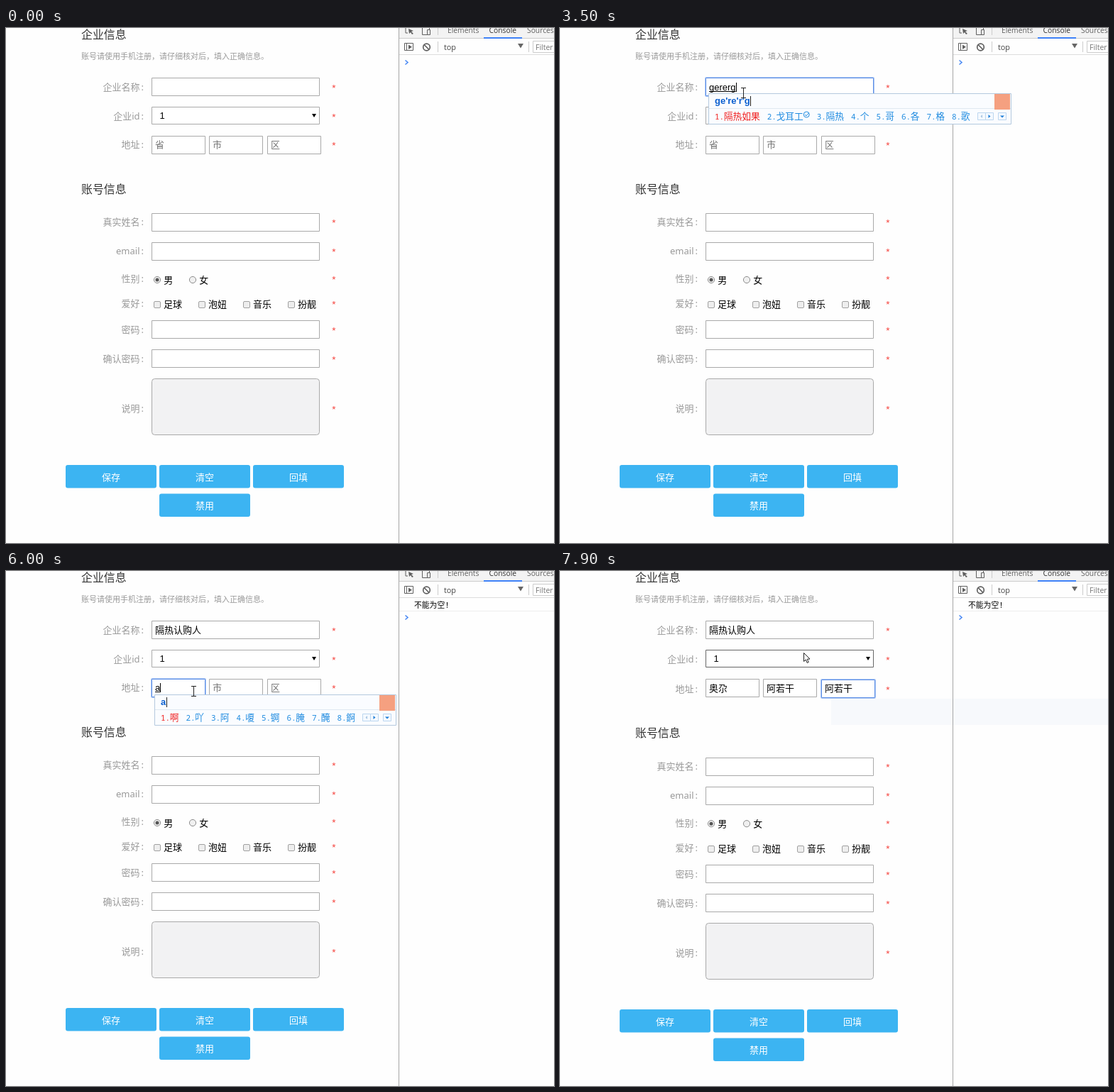
These frames come from a looping animation (772x726 px, 8000 ms). An HTML page with a canvas:

```html
<!DOCTYPE html>
<html lang="zh">
<head>
<meta charset="utf-8">
<style>
html, body { margin: 0; width: 100%; height: 100%; overflow: hidden; background: #fefefe; }
canvas { display: block; }
</style>
</head>
<body>
<canvas id="stage" width="772" height="726"></canvas>
<script>
const ctx = document.getElementById('stage').getContext('2d');
const LOOP = 8000, STEP = 100, SHIFT_AT = 6700, CHECK_AT = 4600;
const LEFT = 205, WIDE = 236;
const CJK = '"Noto Sans CJK SC", "Noto Sans CJK", sans-serif';
const PAGE = '"Noto Sans", ' + CJK;
const INPUT = '"Liberation Sans", ' + CJK;
const TOOL = '"Open Sans", ' + CJK;

const fields = {
  name: { x: LEFT, y: 70, w: WIDE },
  prov: { x: LEFT, y: 152, w: 75, hint: '省' },
  city: { x: 286, y: 152, w: 75, hint: '市' },
  area: { x: 368, y: 152, w: 75, hint: '区' }
};
const address = ['prov', 'city', 'area'];
const plainRows = [261, 302, 412, 453];

const wordsA = '啊 吖 阿 嗄 锕 腌 醃 錒';
const wordsAr = '阿热 啊 吖 阿 嗄 锕 腌 醃';
const wordsArg = '阿若干 阿热 阿让 啊 吖 阿 嗄 锕';
const wordsG = '个 哥 各 格 歌 给 过 国';

// time, focused field, committed text, composition, candidates ("+" adds a check badge)
const script = [
  [2200, 'name', ''],
  [3200, 'name', '', 'g', wordsG],
  [3300, 'name', '', "ge'r", '个人 戈尔 个 哥 各 格 歌 隔'],
  [3400, 'name', '', "ge're", '隔热 个 哥 各 格 歌 隔 割'],
  [3500, 'name', '', "ge're'r'g", '隔热如果 戈耳工+ 隔热 个 哥 各 格 歌'],
  [3600, 'name', '', "ge're'r'g'r", '隔热认购人 戈耳工+ 隔热 个人 各人 哥 格 歌'],
  [3700, 'name', '隔热认购人'],
  [CHECK_AT, null],
  [5300, 'prov', ''],
  [6000, 'prov', '', 'a', wordsA],
  [6100, 'prov', '', 'ao', '奥 傲 熬 澳 袄 凹 敖 翱'],
  [6200, 'prov', '', "ao'g", '奥尕 奥 傲 熬 澳 袄 凹 敖'],
  [6300, 'prov', '奥尕'],
  [6400, 'city', ''],
  [6500, 'city', '', "a'r", wordsAr],
  [6700, 'city', '', "a'r'g", wordsArg],
  [6800, 'city', '阿若干'],
  [7000, 'area', ''],
  [7100, 'area', '', 'a', wordsA],
  [7200, 'area', '', "a'r", wordsAr],
  [7300, 'area', '', "a'r'g", wordsArg],
  [7400, 'area', '阿若干']
];
// the first long composition shows eight candidates
script[4][4] = script[4][4].replace('隔热 个 哥', '隔热 个 哥 各').replace('各 各', '各');

const path = [
  [100, 766, 162], [200, 661, 371], [300, 583, 446], [400, 441, 596], [500, 330, 640],
  [700, 262, 630], [900, 242, 552], [1100, 250, 80], [1300, 256, 442], [1500, 256, 442],
  [1900, 258, 164], [2200, 258, 91], [3700, 258, 91], [3900, 278, 198], [4000, 272, 206],
  [4200, 167, 577], [4400, 163, 634], [4600, 163, 634], [4800, 358, 207], [5100, 270, 172],
  [5300, 264, 169], [6300, 264, 169], [6400, 330, 165], [6800, 330, 165], [6900, 397, 165],
  [7400, 397, 165], [7500, 330, 366], [7600, 330, 362], [7700, 332, 268], [7800, 372, 205],
  [7900, 343, 115]
];

// cy is the middle of the line
function text(s, x, cy, size, color, family = PAGE, align = 'left', weight = 400) {
  ctx.font = `${weight} ${size}px ${family}`;
  ctx.fillStyle = color;
  ctx.textAlign = align;
  ctx.fillText(s, x, cy + size * 0.37);
  return ctx.measureText(s).width;
}

function rect(x, y, w, h, color) {
  ctx.fillStyle = color;
  ctx.fillRect(x, y, w, h);
}

function frame(x, y, w, h, border, fill, radius = 0) {
  ctx.beginPath();
  ctx.roundRect(x + 0.5, y + 0.5, w, h, radius);
  if (fill) { ctx.fillStyle = fill; ctx.fill(); }
  if (border) { ctx.strokeStyle = border; ctx.lineWidth = 1; ctx.stroke(); }
}

function poly(points, fill, stroke, width = 1, close = true) {
  ctx.beginPath();
  points.forEach(([x, y]) => ctx.lineTo(x, y));
  if (close) ctx.closePath();
  if (fill) { ctx.fillStyle = fill; ctx.fill(); }
  if (stroke) { ctx.strokeStyle = stroke; ctx.lineWidth = width; ctx.stroke(); }
}

function disc(x, y, r, fill, stroke, width = 1) {
  ctx.beginPath();
  ctx.arc(x, y, r, 0, 7);
  if (fill) { ctx.fillStyle = fill; ctx.fill(); }
  if (stroke) { ctx.strokeStyle = stroke; ctx.lineWidth = width; ctx.stroke(); }
}

function label(s, cy) {
  text(s, 188.5, cy, 13, '#999', PAGE, 'right');
  text(':', 192.3, cy, 13, '#999', PAGE, 'center');
  text('*', 462, cy + 1, 13.5, '#f5403a', INPUT, 'center');
}

function button(s, x, y) {
  frame(x - 0.5, y - 0.5, 128, 32.5, null, '#3cb4f2', 3);
  text(s, x + 64, y + 16.7, 13, '#fff', PAGE, 'center');
}

function stateAt(t) {
  const texts = {};
  let now = null;
  for (const row of script) {
    if (row[0] > t) break;
    now = row;
    if (row[1]) texts[row[1]] = row[2];
  }
  const [since = 0, focus = null, , ime = '', words = ''] = now || [];
  return { texts, focus, ime, words, caret: (t - since) % 1000 < 500 };
}

function cursorAt(t) {
  if (t < path[0][0]) return null;
  const i = path.findIndex(p => p[0] > t);
  if (i < 0) return path[path.length - 1].slice(1);
  const [t0, x0, y0] = path[i - 1], [t1, x1, y1] = path[i];
  const k = (t - t0) / (t1 - t0);
  return [x0 + (x1 - x0) * k, y0 + (y1 - y0) * k];
}

const inside = (p, x, y, w, h) => p && p[0] >= x && p[0] <= x + w && p[1] >= y && p[1] <= y + h;

function drawField(id, state, t) {
  const f = fields[id], focused = state.focus === id;
  const value = state.texts[id] || '';
  const typed = focused && state.ime ? state.ime.replace(/'/g, '') : value;
  const shifted = t >= SHIFT_AT && id !== 'name';
  const y = f.y + (shifted && (focused || !value) ? 1 : 0);
  const wrong = id === 'prov' && t >= CHECK_AT && t < 5300;
  if (focused) frame(f.x - 1, y - 1, f.w + 2, 27, '#a9c5f3', null, 1);
  frame(f.x, y, f.w, 25, focused ? '#5c8ee6' : '#a9a9a9', wrong ? '#ffa680' : '#fff');
  const cy = f.y + (shifted || id === 'name' ? 13.5 : 12.5);
  const x = f.x + 5;
  if (!typed && f.hint) text(f.hint, x, cy, 13, '#757575', INPUT);
  const w = typed ? text(typed, x, cy, 13, '#000', INPUT) : 0;
  if (focused && state.ime) rect(x, Math.round(cy + 5.5), w, 1, '#000');
  if (focused && state.caret) rect(Math.round(x + w), Math.floor(cy - 6.5), 1, 13, '#000');
}

function drawForm(state, t, pointer) {
  const d = t >= SHIFT_AT ? 2 : 0;
  text('企业信息', 106, 9.5, 15.9, '#333');
  text('账号请使用手机注册，请仔细核对后，填入正确信息。', 106, 40, 11, '#999');
  text('账号信息', 106, 227 + d * 0.75, 15.9, '#333');

  label('企业名称', 83);
  label('企业id', 124);
  label('地址', 164.5 + d * 0.75);
  ['真实姓名', 'email', '性别', '爱好', '密码', '确认密码', '说明'].forEach((s, i) =>
    label(s, [273.5, 314.5, 353.5, 388.5, 425.5, 466.5, 536.5][i] + d));

  drawField('name', state, t);
  const hover = inside(pointer, LEFT, 111, WIDE, 25);
  frame(LEFT, 111, WIDE, 24, hover ? '#666' : '#a9a9a9', '#fff');
  text('1', 216.5, 123.5, 13, '#000', INPUT);
  poly([[431, 121], [437, 121], [434, 126]], '#000');
  address.forEach(id => drawField(id, state, t));

  plainRows.forEach(y => frame(LEFT, y + d, WIDE, 25, '#a9a9a9', '#fff'));
  frame(LEFT, 494 + d, WIDE, 79, '#a9a9a9', '#f2f2f3', 4);

  [['男', 213], ['女', 263]].forEach(([s, x], i) => {
    disc(x, 355 + d * 0.6, 4.6, '#f0f0f0', '#8c8c8c');
    if (!i) disc(x, 355 + d * 0.6, 2.5, '#555');
    text(s, x + 9.3, 354.7 + d * 0.6, 13, '#000');
  });
  ['足球', '泡妞', '音乐', '扮靓'].forEach((s, i) => {
    const x = 208 + i * 63;
    frame(x, 385 + d, 9, 9, '#a0a0a0', '#eee', 1.5);
    text(s, x + 14, 389 + d, 13, '#000');
  });

  ['保存', '清空', '回填'].forEach((s, i) => button(s, 84 + i * 132, 616 + d));
  button('禁用', 216, 656.5 + d);
}

function drawTools(t) {
  rect(553, 0, 1, 726, '#a6a6a6');
  rect(554, 0, 218, 14, '#f3f3f3');
  rect(554, 14, 218, 1, '#ccc');
  rect(554, 37, 218, 1, '#ddd');
  rect(673, 13, 54, 2, '#3e82f7');

  const ink = '#5f5f5f';
  poly([[566, -1], [563, -1], [563, 7], [566, 7]], null, ink, 1, false);
  poly([[567, 1], [574, 4], [571, 5], [574, 8], [572, 9], [570, 6], [568, 8]], ink);
  frame(586, -3, 10, 12, ink);
  frame(593, 2, 4, 7, ink, '#f3f3f3');
  rect(608, 0, 1, 10, '#ccc');
  text('Elements', 622, 3.5, 10.3, ink, TOOL);
  text('Console', 680.5, 3.5, 10.3, '#333', TOOL);
  text('Sources', 734, 3.5, 10.3, ink, TOOL);

  frame(561, 21, 12, 10, ink);
  rect(564, 22, 1, 10, ink);
  poly([[567, 23.5], [572, 26.7], [567, 30]], ink);
  disc(592.5, 27, 4.8, null, ink, 1.7);
  poly([[589, 23.5], [596, 30.5]], null, ink, 1.7);
  rect(608, 19, 1, 15, '#ccc');
  text('top', 617, 27, 10.8, '#444', TOOL);
  poly([[721, 22], [729, 22], [725, 28.5]], '#666');
  rect(736, 19, 1, 15, '#ccc');
  frame(742, 18, 40, 16, '#ccc', '#fff');
  text('Filter', 746, 27, 10.5, '#777', TOOL);

  const logged = t >= CHECK_AT;
  if (logged) {
    text('不能为空!', 575, 48.5, 10.8, '#000', '"Noto Sans Mono", ' + CJK);
    rect(554, 56, 218, 1, '#eee');
  }
  const py = logged ? 65.5 : 48.5;
  poly([[562.5, py - 3], [566, py], [562.5, py + 3]], null, '#4a8af4', 1.6, false);
}

function drawIme(state) {
  const f = fields[state.focus], x = f.x + 4, y = f.y + 22, unit = 12.75;
  const words = state.words.split(' ');
  const width = w => unit * (1 + w.replace('+', '').length) + (w.includes('+') ? 9 : 0) + 10;
  const end = words.reduce((sum, w) => sum + width(w), x + 9);
  const right = Math.round(end + 48);
  frame(x, y, right - x - 1, 43, '#b4c9de', '#fafcff');
  rect(x + 1, y + 21, right - x - 2, 1, '#dfe8f1');
  const w = text(state.ime, x + 9, y + 10.5, 13, '#0b5fd0', INPUT, 'left', 700);
  rect(Math.round(x + 9.5 + w), y + 4, 1, 14, '#222');

  let cx = x + 9;
  words.forEach((word, i) => {
    const plain = word.replace('+', ''), color = i ? '#1f8be0' : '#f02020';
    text(i + 1 + '.', cx, y + 33, 11, color, '"Noto Sans Mono", monospace');
    text(plain, cx + unit, y + 32.5, unit, color, CJK, 'left', 300);
    if (plain !== word) {
      const bx = cx + unit * (1 + plain.length) + 4.5, by = y + 30;
      disc(bx, by, 4, null, color);
      poly([[bx - 2, by], [bx - 0.5, by + 2], [bx + 3, by - 2]], null, color, 1, false);
    }
    cx += width(word);
  });

  const a = Math.round(end), m = y + 32.5;
  [a, a + 11, a + 29].forEach(bx => frame(bx, y + 27, 11, 10, '#bcd6ef', '#f4f9ff'));
  poly([[a + 7, m - 2.5], [a + 7, m + 2.5], [a + 4.5, m]], '#a9c6e2');
  poly([[a + 15.5, m - 2.5], [a + 15.5, m + 2.5], [a + 18.5, m]], '#1f7fd8');
  poly([[a + 32, m - 1], [a + 38, m - 1], [a + 35, m + 2]], '#1f7fd8');
  rect(right - 24, y + 1, 22, 22, '#f5a080');
}

function drawPointer(p) {
  const x = Math.round(p[0]), y = Math.round(p[1]);
  const overText = Object.values(fields).some(f => inside(p, f.x, f.y, f.w, 26)) ||
    plainRows.some(fy => inside(p, LEFT, fy, WIDE, 25)) || inside(p, LEFT, 494, WIDE, 79);
  if (overText) {
    rect(x, y - 6, 1, 13, '#222');
    rect(x - 3, y - 7, 7, 1, '#222');
    rect(x - 3, y + 7, 7, 1, '#222');
    return;
  }
  poly([[0.5, 0.5], [0.5, 12.5], [3.3, 10], [5.2, 14.5], [7.2, 13.6], [5.3, 9.3], [9, 9]]
    .map(([dx, dy]) => [x + dx, y + dy]), '#fff', '#222');
}

function draw(now) {
  const t = Math.floor((now % LOOP) / STEP) * STEP;
  const state = stateAt(t), pointer = cursorAt(t);
  rect(0, 0, 772, 726, '#fefefe');
  if (t >= 7400) rect(382, 180, 390, 37, '#f7f9fc');
  drawForm(state, t, pointer);
  drawTools(t);
  if (state.ime) drawIme(state);
  if (pointer) drawPointer(pointer);
}

const start = performance.now();
function tick() {
  draw(performance.now() - start);
  requestAnimationFrame(tick);
}
tick();
</script>
</body>
</html>
```
